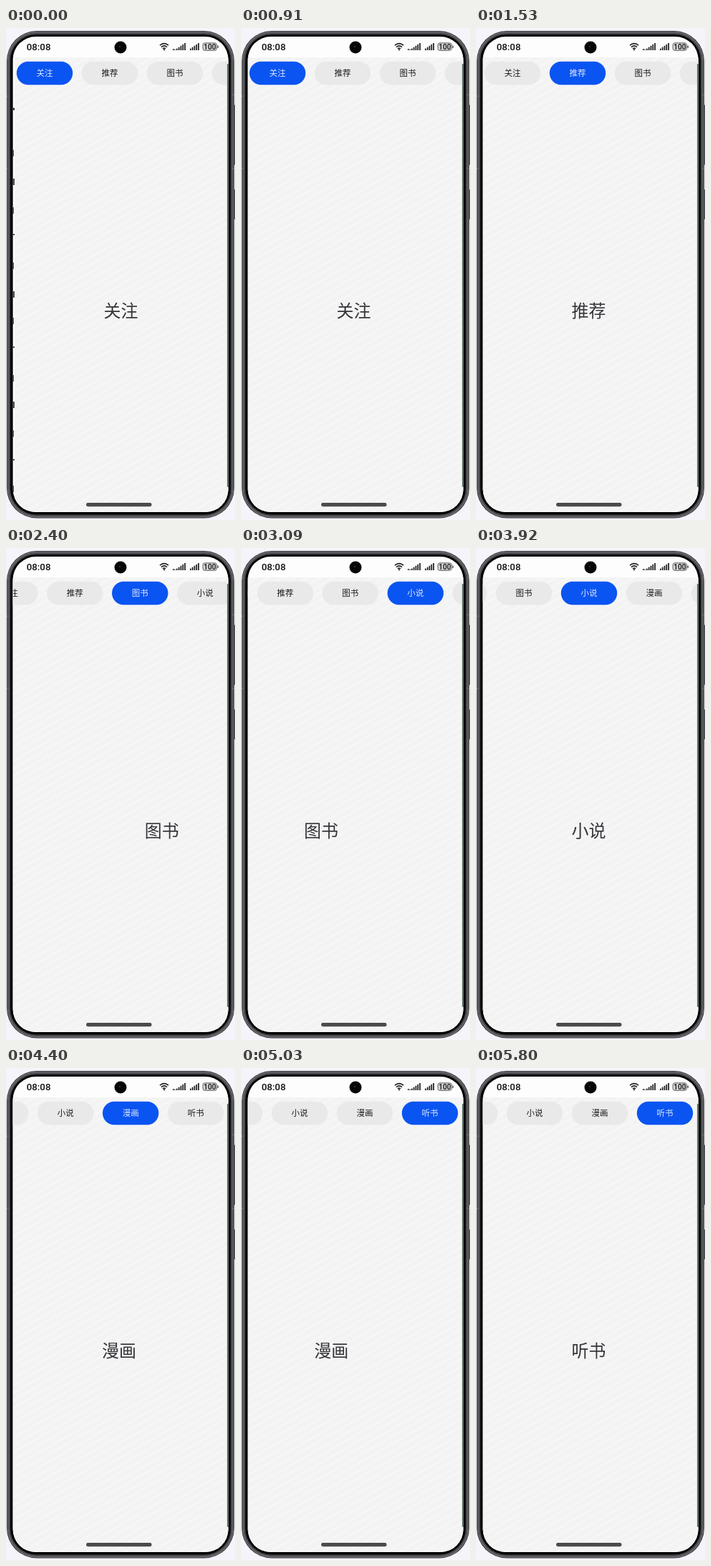
Animation, 320 px wide and 686 px high, one loop 6130 ms. Source, as an HTML page:

```html
<!DOCTYPE html>
<html lang="zh-CN">
<head>
<meta charset="utf-8">
<title>Tabs</title>
<style>
  html, body { margin: 0; width: 100%; height: 100%; overflow: hidden; background: #f4f4fa; }
  svg { display: block; width: 100%; height: 100%; }
  text { text-anchor: middle; font-family: "Noto Sans CJK SC", "Noto Sans CJK", "Noto Sans", sans-serif; }
  .label { font-size: 11.5px; }
  .title { font-size: 24px; fill: #35363a; }
  .status { font-family: Roboto, "Noto Sans", sans-serif; font-weight: 500; fill: #111; }
</style>
</head>
<body>
<svg viewBox="0 0 320 686" xmlns="http://www.w3.org/2000/svg">
  <defs>
    <clipPath id="screen"><rect x="9.6" y="12" width="301" height="663" rx="32"/></clipPath>
    <pattern id="stripes" width="10" height="9" patternUnits="userSpaceOnUse" patternTransform="rotate(-30)">
      <rect width="10" height="9" fill="#f3f3f3"/>
      <rect width="10" height="3" fill="#f6f6f6"/>
    </pattern>
  </defs>

  <!-- phone body -->
  <g fill="#55565c">
    <rect x="318" y="107" width="2" height="84" rx="1"/>
    <rect x="318" y="225" width="2" height="42" rx="1"/>
  </g>
  <rect x="1" y="4" width="318" height="679.5" rx="42" fill="#38393c"/>
  <rect x="2.8" y="5.8" width="314.4" height="675.9" rx="40.4" fill="none" stroke="#6f7074" stroke-width="1.5"/>
  <rect x="4.6" y="7.6" width="310.8" height="672.2" rx="38.5" fill="none" stroke="#4c4d51" stroke-width="2"/>
  <rect x="6" y="9" width="308" height="669.5" rx="36.5" fill="#000"/>
  <path d="M1 95h3M1 196h3M316 93h3M316 196h3" stroke="#77787c" stroke-width="1.2"/>

  <g clip-path="url(#screen)">
    <rect x="9" y="12" width="302" height="663" fill="#fdfdfd"/>
    <g id="behind" fill="#222"></g>
    <g id="page">
      <rect x="9" y="41" width="306" height="634" fill="url(#stripes)"/>
      <g id="tabs"></g>
      <g id="titles"></g>
    </g>
    <path d="M310 50V640" stroke="#0e2c14" stroke-width="1.4"/>
  </g>

  <!-- status bar -->
  <text class="status" x="45.6" y="31" font-size="13.3">08:08</text>
  <circle cx="160" cy="27" r="8.5" fill="#060607"/>
  <circle cx="159" cy="26" r="1.3" fill="#2c2c33"/>
  <path d="M215 24.2Q221 19 227 24.2M217 26.6Q221 23.2 225 26.6M219 28.8Q221 27.2 223 28.8"
    fill="none" stroke="#1a1a1a" stroke-width="1.6"/>
  <circle cx="221" cy="30.3" r="1.1" fill="#1a1a1a"/>
  <path d="M233 29h1.6v2H233zM235.4 29.5h1.4V31h-1.4z" fill="#333"/>
  <g id="bars" fill="#1a1a1a"></g>
  <rect x="275" y="20.8" width="19.5" height="10.6" rx="3" fill="#d0d0d0" stroke="#6a6a6a" stroke-width="1"/>
  <path d="M296.2 24.5v3.4" stroke="#555" stroke-width="1.4"/>
  <text class="status" x="284.8" y="29.8" font-size="10">100</text>

  <rect x="112" y="662.1" width="91.6" height="5.1" rx="2.4" fill="#4b4b4b"/>
</svg>
<script>
const LOOP = 6130, STEP = 70;
const NAMES = ['关注', '推荐', '图书', '小说', '漫画', '听书'];
const PITCH = 91, FIRST_X = 11.8, TAB_W = 78.4, CENTER = 157.4, PAGE_W = 300, MAX_SCROLL = 242;
// moment each swipe is released, moving one tab forward
const SWIPES = [970, 2235, 3052, 3925, 5000];
// spans in which the screen refreshes; it holds still between them
const SPANS = [[0, 280], [910, 1260], [1460, 1740], [2400, 2470], [2600, 2600], [2740, 3090],
  [3220, 3920], [3990, 4130], [4400, 4960], [5030, 5310], [5450, 5800]];

const $ = id => document.getElementById(id);
function add(parent, tag, attrs, text = '') {
  const el = document.createElementNS('http://www.w3.org/2000/svg', tag);
  for (const key in attrs) el.setAttribute(key, attrs[key]);
  el.textContent = text;
  return parent.appendChild(el);
}

const tabs = NAMES.map((name, i) => {
  const x = FIRST_X + i * PITCH;
  return {
    pill: add($('tabs'), 'rect', { x, y: 46.8, width: TAB_W, height: 32.4, rx: 16.2 }),
    label: add($('tabs'), 'text', { x: x + TAB_W / 2, y: 67.2, class: 'label' }, name),
  };
});
NAMES.forEach((name, i) =>
  add($('titles'), 'text', { x: CENTER + i * PAGE_W, y: 403, class: 'title' }, name));

for (const left of [238, 257])
  for (let i = 0; i < 5; i++) {
    const h = 2.4 + i * 1.9;
    add($('bars'), 'rect', { x: left + i * 2.8, y: 31 - h, width: 1.7, height: h });
  }

// edge of the list page that is being covered
add($('behind'), 'rect', { x: 9, y: 111.5, width: 3, height: 3 });
for (let i = 0; i < 13; i++)
  add($('behind'), 'rect', { x: 9, y: 170 + i * 39 + (i % 3), width: 2 + (i % 2), height: i % 4 === 3 ? 2 : 9, opacity: .8 });

const spring = x => x <= 0 ? 0 : 1 - (1 + x) * Math.exp(-x);
const scrollStop = i => Math.min(MAX_SCROLL, Math.max(0, i * PITCH - 107));

function heldTime(t) {
  const [start, end] = SPANS.filter(span => span[0] <= t).pop();
  return Math.min(end, start + Math.floor((t - start) / STEP) * STEP);
}

function draw(time) {
  const t = heldTime(time);
  let page = 0, scroll = 0, selected = 0;
  SWIPES.forEach((start, i) => {
    page += spring((t - start) * .0181);
    scroll += (scrollStop(i + 1) - scrollStop(i)) * spring((t - start - 9) * .0132);
    if (t >= start) selected = i + 1;
  });
  const entry = t < 280 ? 3 * (1 - t / 280) ** 2 : 0;
  $('page').setAttribute('transform', `translate(${entry} 0)`);
  $('behind').setAttribute('visibility', entry ? 'visible' : 'hidden');
  $('tabs').setAttribute('transform', `translate(${-scroll} 0)`);
  $('titles').setAttribute('transform', `translate(${-page * PAGE_W} 0)`);
  tabs.forEach(({ pill, label }, i) => {
    pill.setAttribute('fill', i === selected ? '#0a54f1' : '#e9e9ea');
    label.setAttribute('fill', i === selected ? '#e0e9ff' : '#1c1c1e');
  });
}

const origin = performance.now();
function frame() {
  draw((performance.now() - origin) % LOOP);
  requestAnimationFrame(frame);
}
frame();
</script>
</body>
</html>
```
